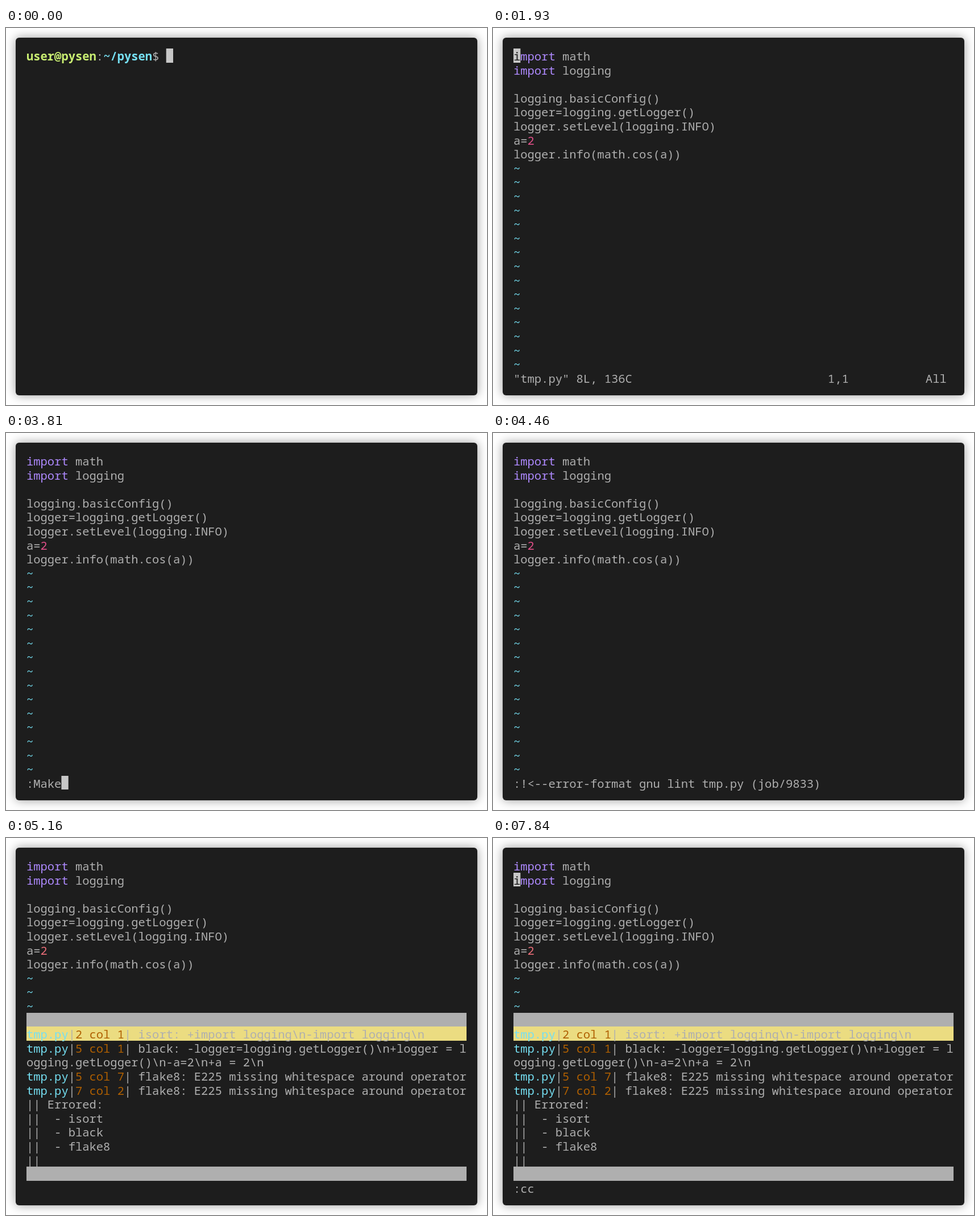
An HTML page with a canvas for the animation above (8000 ms loop, 846x662 px).

```html
<!DOCTYPE html>
<html lang="en">
<head>
<meta charset="utf-8">
<title>Terminal session</title>
<style>
  html, body { margin: 0; width: 100%; height: 100%; overflow: hidden; background: #fff; }
  #window {
    position: absolute; left: 17px; top: 17px; width: 812px; height: 628px;
    border-radius: 6px; background: #1d1d1d; box-shadow: 0 0 18px rgba(0, 0, 0, .4);
  }
  canvas { position: absolute; left: 0; top: 0; }
</style>
</head>
<body>
<div id="window"></div>
<canvas id="screen" width="846" height="662"></canvas>
<script>
const ctx = document.getElementById('screen').getContext('2d');
const LOOP = 8000, KEY = 90;
const LEFT = 36, TOP = 36, COLS = 63, CELL_H = 24.6, FONT_SIZE = 20.476;
const CELL_W = FONT_SIZE * 0.6;
const color = {
  text: '#afafaf', back: '#1d1d1d', cursor: '#c7c7c7', green: '#c8ed71', blue: '#75dff2',
  purple: '#ae89fe', yellow: '#ebdc81', orange: '#af5f00', pink: '#e04f88', coral: '#e96d78'
};
const cellX = col => LEFT + col * CELL_W;
const cellY = row => Math.round(TOP + row * CELL_H);

function put(row, col, text, fill = color.text, weight = 400) {
  ctx.font = `${weight} ${FONT_SIZE}px "Noto Sans Mono", monospace`;
  ctx.fillStyle = fill;
  ctx.fillText(text, cellX(col), cellY(row) + 21);
}

function block(row, col, width, fill) {
  ctx.fillStyle = fill;
  ctx.fillRect(cellX(col), cellY(row), width * CELL_W, cellY(row + 1) - cellY(row));
}

function cursor(row, col, letter = '') {
  block(row, col, 1, color.cursor);
  put(row, col, letter, color.back);
}

const bar = (row, fill) => block(row, 0, COLS, fill);

function tildes(first, last) {
  for (let row = first; row <= last; row++) put(row, 0, '~', color.blue);
}

// The part of a text typed by time t, one letter per key press.
const typed = (text, t, start) =>
  text.slice(0, Math.max(0, Math.floor((t - start) / KEY + 1e-6) + 1));

function shell(t) {
  put(0, 0, 'user@pysen', color.green, 700);
  put(0, 10, ':');
  put(0, 11, '~/pysen', color.blue, 700);
  put(0, 18, '$');
  const command = typed('vim tmp.py', t, 600);
  put(0, 20, command);
  if (t < 1910) cursor(0, 20 + command.length);
  else cursor(1, 0);
}

function sourceCode(numberColor) {
  ['math', 'logging'].forEach((name, row) => {
    put(row, 0, 'import', color.purple);
    put(row, 7, name);
  });
  ['logging.basicConfig()', 'logger=logging.getLogger()', 'logger.setLevel(logging.INFO)',
   'a=', 'logger.info(math.cos(a))'].forEach((line, i) => put(3 + i, 0, line));
  put(6, 2, '2', numberColor);
}

function commandLine(text, showCursor = true) {
  put(23, 0, text);
  if (showCursor) cursor(23, text.length);
}

function editor(t) {
  sourceCode(color.pink);
  tildes(8, 22);
  if (t < 3330) {
    cursor(0, 0, 'i');
    if (t < 2830) put(23, 0, '"tmp.py" 8L, 136C');
    put(23, 45, '1,1');
    put(23, 59, 'All');
  } else {
    commandLine(':' + typed('Make', t, 3540), t < 4310);
  }
}

function splitFrame() {
  bar(11, color.text);
  bar(12, color.yellow);
  bar(22, color.text);
  tildes(8, 10);
}

function running(t) {
  sourceCode(color.pink);
  if (t < 4480) {
    tildes(8, 22);
  } else {
    splitFrame();
    tildes(13, 21);
    cursor(0, 0, 'i');
  }
  put(23, 0, ':!<--error-format gnu lint tmp.py (job/9833)');
}

function finding(row, place, message) {
  put(row, 0, 'tmp.py', color.blue);
  put(row, 6, '|');
  put(row, 7, place, color.orange);
  put(row, 14, '| ' + message);
}

function results(t) {
  sourceCode(color.coral);
  splitFrame();
  finding(12, '2 col 1', String.raw`isort: +import logging\n-import logging\n`);
  finding(13, '5 col 1', String.raw`black: -logger=logging.getLogger()\n+logger = l`);
  put(14, 0, String.raw`ogging.getLogger()\n-a=2\n+a = 2\n`);
  finding(15, '5 col 7', 'flake8: E225 missing whitespace around operator');
  finding(16, '7 col 2', 'flake8: E225 missing whitespace around operator');
  ['|| Errored:', '||  - isort', '||  - black', '||  - flake8', '||']
    .forEach((line, i) => put(17 + i, 0, line));
  bar(22, color.text);
  if (t >= 7160) commandLine(typed(':cc', t, 7160), t < 7840);
  if (t >= 7840) cursor(1, 0, 'i');
}

function draw(t) {
  ctx.clearRect(0, 0, 846, 662);
  if (t < 1930) shell(t);
  else if (t < 4400) editor(t);
  else if (t < 5160) running(t);
  else results(t);
}

const start = performance.now();
function tick() {
  draw((performance.now() - start) % LOOP);
  requestAnimationFrame(tick);
}
tick();
</script>
</body>
</html>
```
